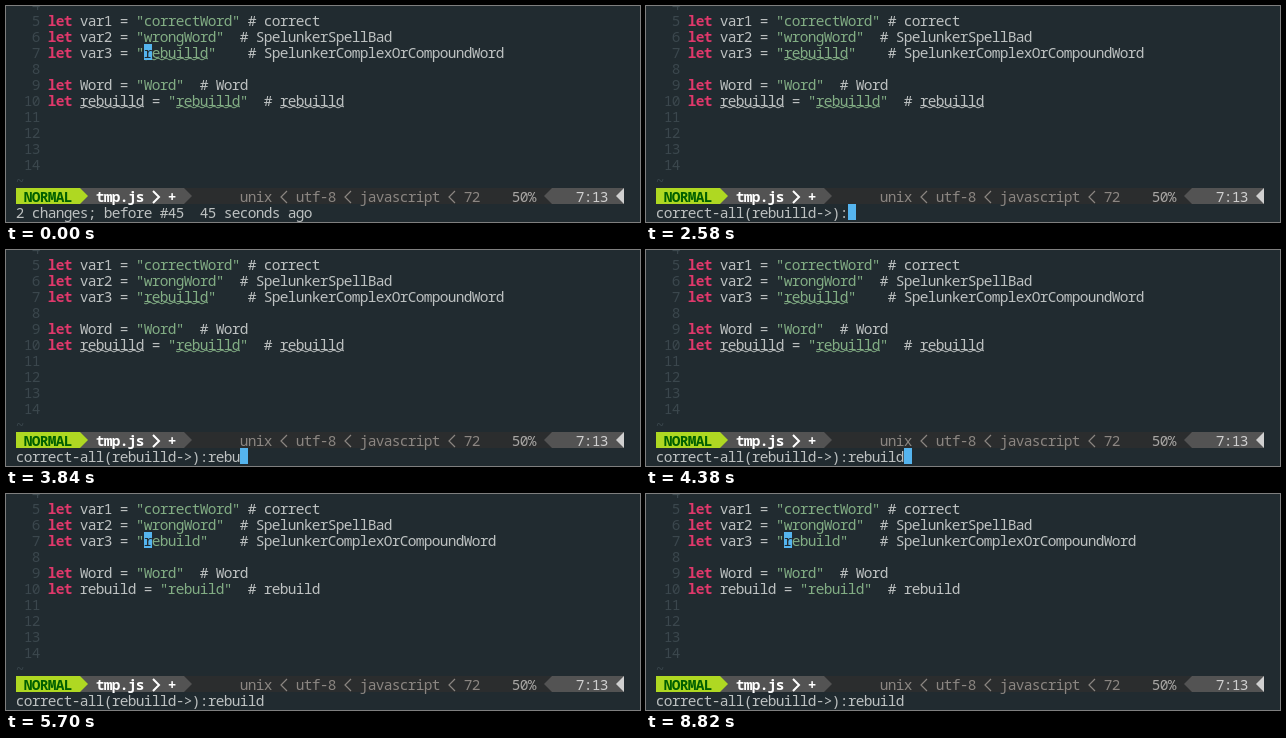
These frames come from a looping animation (634 by 216 pixels, 9 s). An HTML page with a canvas:

```html
<!DOCTYPE html>
<html lang="en">
<head>
<meta charset="utf-8">
<title>Spelling correction in an editor</title>
<style>
  html, body { margin: 0; width: 100%; height: 100%; overflow: hidden; background: #212b30; }
  canvas { display: block; }
</style>
</head>
<body>
<canvas id="stage" width="634" height="216"></canvas>
<script>
const ctx = document.getElementById('stage').getContext('2d');
const LOOP = 9000, CELL = 8, ROW = 16, LEFT = 10, CODE_X = 42;
const PROMPT_AT = 1980, APPLY_AT = 5640;
const KEY_TIMES = [3120, 3360, 3660, 3840, 4020, 4200, 4380];
const STATUS_Y = 182, COMMAND_Y = 198;
const PROMPT = 'correct-all(rebuilld->):', FIXED = 'rebuild', WRONG = 'rebuilld';
const C = {
  back: '#212b30', text: '#bdc1c1', number: '#3b474d', keyword: '#e0386b',
  string: '#82ad84', cursor: '#55b4ee', mode: '#afd822', modeText: '#005f00',
  bar: '#2b2d2e', panel: '#535353', faint: '#8b8682', white: '#ffffff', light: '#d0d0d0'
};

const rowTop = line => 6 + (line - 5) * ROW;

function box(x, y, w, h, color) {
  ctx.fillStyle = color;
  ctx.fillRect(x, y, w, h);
}

// One character per terminal cell.
function write(text, x, top, color, weight = 500) {
  ctx.font = `${weight} 14.5px "Noto Sans Mono", "DejaVu Sans Mono", monospace`;
  ctx.textAlign = 'center';
  ctx.fillStyle = color;
  [...text].forEach((ch, i) => ctx.fillText(ch, x + (i + 0.5) * CELL, top + 14));
}

function wave(x, y, width, color) {
  ctx.strokeStyle = color;
  ctx.lineWidth = 1;
  ctx.beginPath();
  for (let dx = 0; dx <= width; dx++) {
    ctx.lineTo(x + dx, y + 0.8 * Math.sin(dx / CELL * 2 * Math.PI));
  }
  ctx.stroke();
}

function arrow(x, dir, color) {
  const base = dir > 0 ? x : x + CELL;
  ctx.fillStyle = color;
  ctx.beginPath();
  ctx.moveTo(base, STATUS_Y);
  ctx.lineTo(base + dir * CELL, STATUS_Y + ROW / 2);
  ctx.lineTo(base, STATUS_Y + ROW);
  ctx.fill();
}

function chevron(x, dir, color, width) {
  const base = dir > 0 ? x + 1 : x + 7;
  ctx.strokeStyle = color;
  ctx.lineWidth = width;
  ctx.beginPath();
  ctx.moveTo(base, STATUS_Y + 3);
  ctx.lineTo(base + dir * 6, STATUS_Y + 9);
  ctx.lineTo(base, STATUS_Y + 15);
  ctx.stroke();
}

function codeLine(line, source) {
  const top = rowTop(line);
  for (const { 0: token, index } of source.matchAll(/"[^"]*"|\blet\b|[^\s"]+/g)) {
    const color = token === 'let' ? C.keyword : token[0] === '"' ? C.string : C.text;
    const x = CODE_X + index * CELL;
    write(token, x, top, color, token === 'let' ? 700 : 500);
    const at = token.indexOf(WRONG);
    if (at >= 0) wave(x + at * CELL, top + 15, WRONG.length * CELL, color);
  }
}

function cursor(x, top, ch = '') {
  box(x, top, CELL, ROW, C.cursor);
  write(ch, x, top, C.back);
}

function statusLine() {
  box(LEFT, STATUS_Y, 608, ROW, C.bar);
  box(74, STATUS_Y, 104, ROW, C.panel);
  arrow(178, 1, C.panel);
  box(LEFT, STATUS_Y, 64, ROW, C.mode);
  arrow(74, 1, C.mode);
  write('NORMAL', 18, STATUS_Y, C.modeText, 700);
  write('tmp.js', 90, STATUS_Y, C.white, 700);
  chevron(146, 1, C.white, 2);
  write('+', 162, STATUS_Y, C.white, 700);

  write('unix', 234, STATUS_Y, C.faint);
  write('utf-8', 290, STATUS_Y, C.faint);
  write('javascript', 354, STATUS_Y, C.faint);
  write('72', 458, STATUS_Y, C.faint);
  for (const x of [274, 338, 442]) chevron(x, -1, C.faint, 1.2);
  write('50%', 506, STATUS_Y, '#a8a6a4');

  arrow(538, -1, C.panel);
  box(546, STATUS_Y, 72, ROW, C.panel);
  write('7:13', 570, STATUS_Y, C.light);
  arrow(610, -1, C.light);
}

function draw(time) {
  const prompting = time >= PROMPT_AT && time < APPLY_AT;
  const word = time < APPLY_AT ? WRONG : FIXED;
  const typed = FIXED.slice(0, KEY_TIMES.filter(key => time >= key).length);

  box(0, 0, 634, 216, C.back);
  for (let line = 4; line <= 14; line++) {
    write(String(line).padStart(2), 18, rowTop(line), C.number);
  }
  write('~', LEFT, rowTop(15), C.number);

  codeLine(5, 'let var1 = "correctWord" # correct');
  codeLine(6, 'let var2 = "wrongWord"  # SpelunkerSpellBad');
  codeLine(7, `let var3 = "${word}"    # SpelunkerComplexOrCompoundWord`);
  codeLine(9, 'let Word = "Word"  # Word');
  codeLine(10, `let ${word} = "${word}"  # ${word}`);
  statusLine();

  const command = time < PROMPT_AT ? '2 changes; before #45  45 seconds ago' : PROMPT + typed;
  write(command, LEFT, COMMAND_Y, C.text);
  if (prompting) cursor(LEFT + command.length * CELL, COMMAND_Y);
  else cursor(138, rowTop(7), 'r');
}

function tick() {
  draw(performance.now() % LOOP);
  requestAnimationFrame(tick);
}
tick();
</script>
</body>
</html>
```
